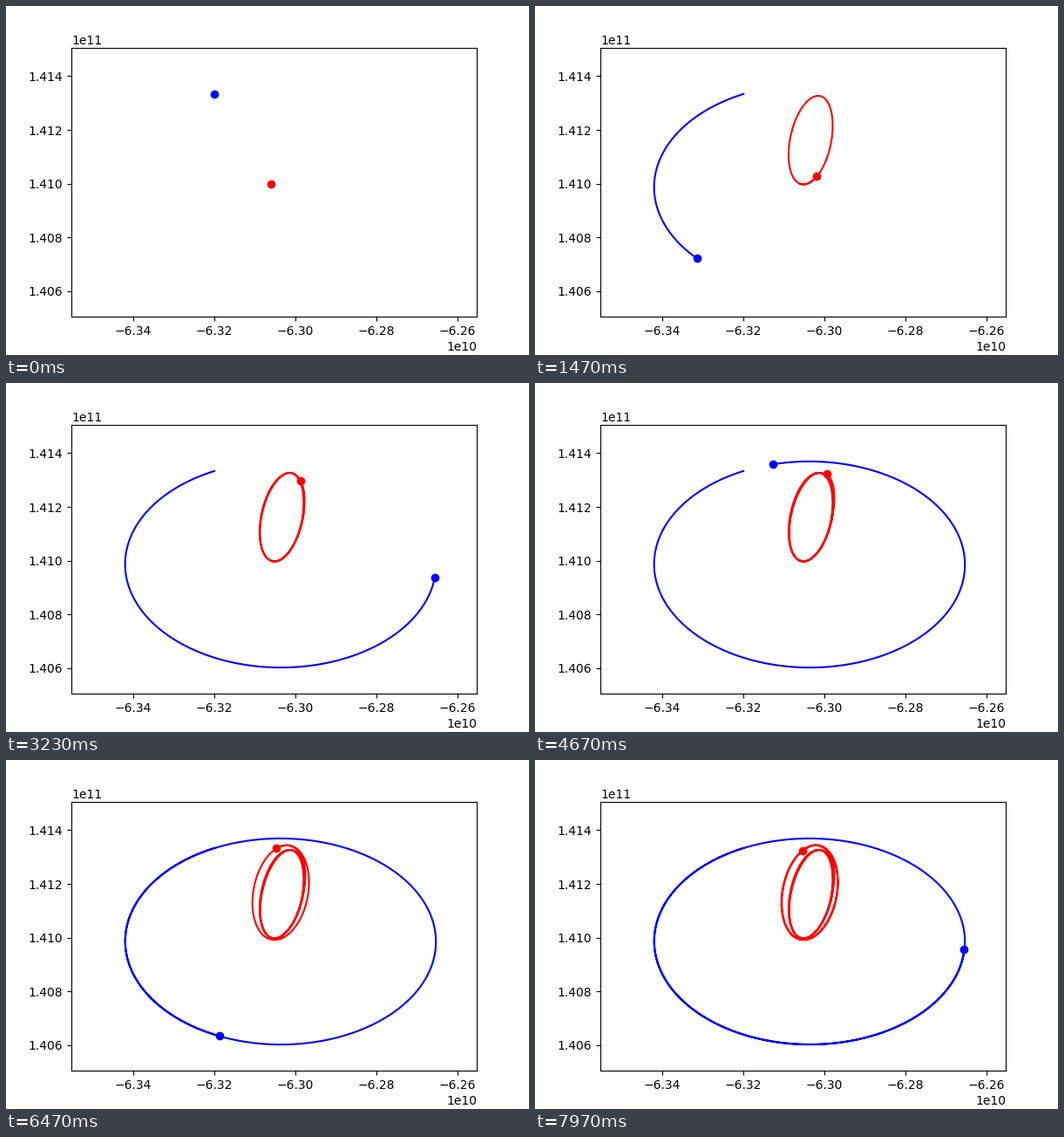
Animation of 600x400 px, one loop 8 s. Source, as a matplotlib script:

```python
import numpy as np
import matplotlib.pyplot as plt
from matplotlib.animation import FuncAnimation

LOOP = 8000       # ms
TICK = 20         # ms per drawn frame
STEPS = 240       # positions shown in one loop
SUB = 20          # trail samples per step
HOLD = 3.4        # steps of rest before the bodies move
CENTER = np.array([-6.3053e10, 1.410054e11])
SPAN = 5e8


def kepler(mean, ecc):
    """Eccentric anomaly from mean anomaly by Newton's method."""
    anom = np.where(mean < 0, -np.pi, np.pi)
    for _ in range(60):
        anom = anom - (anom - ecc * np.sin(anom) - mean) / (1 - ecc * np.cos(anom))
    return anom


def place(anom, a, ecc, peri):
    """Point on an ellipse with its focus at CENTER."""
    u = a * (np.cos(anom) - ecc)
    v = a * np.sqrt(1 - ecc ** 2) * np.sin(anom)
    x = u * np.cos(peri) - v * np.sin(peri)
    y = u * np.sin(peri) + v * np.cos(peri)
    return CENTER[0] + x, CENTER[1] + y


def moon_path(t):
    mean = np.radians(-13.65 + 2.557 * t)
    a = 3.842e8 * (1 - 0.0015 * t / 140)
    ecc = 0.0657
    return place(kepler(mean % (2 * np.pi), ecc), a, ecc, np.radians(129.7))


# Orbit at each perigee passage: time, semi-major axis, eccentricity, perigee angle
ORBITS = np.array([
    (0.04, 1.660e8, 0.9500, 263.4),
    (40.13, 1.660e8, 0.9508, 263.0),
    (80.26, 1.660e8, 0.9516, 262.6),
    (120.4, 1.660e8, 0.9520, 262.4),
    (163.3, 1.768e8, 0.9233, 264.2),
    (206.9, 1.768e8, 0.9258, 264.2),
    (250.5, 1.768e8, 0.9258, 264.2),
])


def craft_path(t):
    lap = np.clip(np.searchsorted(ORBITS[:, 0], t, side="right") - 1, 0, len(ORBITS) - 2)
    now, then = ORBITS[lap].T, ORBITS[lap + 1].T
    mean = 2 * np.pi * (t - now[0]) / (then[0] - now[0])
    anom = kepler(mean, now[2])
    # the orbit shifts to the next one around apogee
    w = np.clip((np.degrees(anom) - 95) / 95, 0, 1)
    w = w * w * (3 - 2 * w)
    a, ecc, peri = (now + (then - now) * w)[1:]
    return place(anom, a, ecc, np.radians(peri))


times = np.arange(STEPS * SUB) / SUB
paths = [moon_path(times), craft_path(times)]

fig, ax = plt.subplots(figsize=(6, 4), dpi=100)
ax.set_xlim(CENTER[0] - SPAN, CENTER[0] + SPAN)
ax.set_ylim(CENTER[1] - SPAN, CENTER[1] + SPAN)

trails = [ax.plot([], [], color=c)[0] for c in ("blue", "red")]
dots = [ax.plot([], [], "o", color=c)[0] for c in ("blue", "red")]


def update(i):
    step = min(round(i * TICK * STEPS / LOOP), STEPS - 1)
    last = max(0, round((step - HOLD) * SUB))
    for (x, y), trail, dot in zip(paths, trails, dots):
        trail.set_data(x[:last + 1], y[:last + 1])
        dot.set_data([x[last]], [y[last]])
    return trails + dots


anim = FuncAnimation(fig, update, frames=LOOP // TICK, init_func=lambda: update(0),
                     interval=TICK, repeat=True, repeat_delay=0)
plt.show()
```
